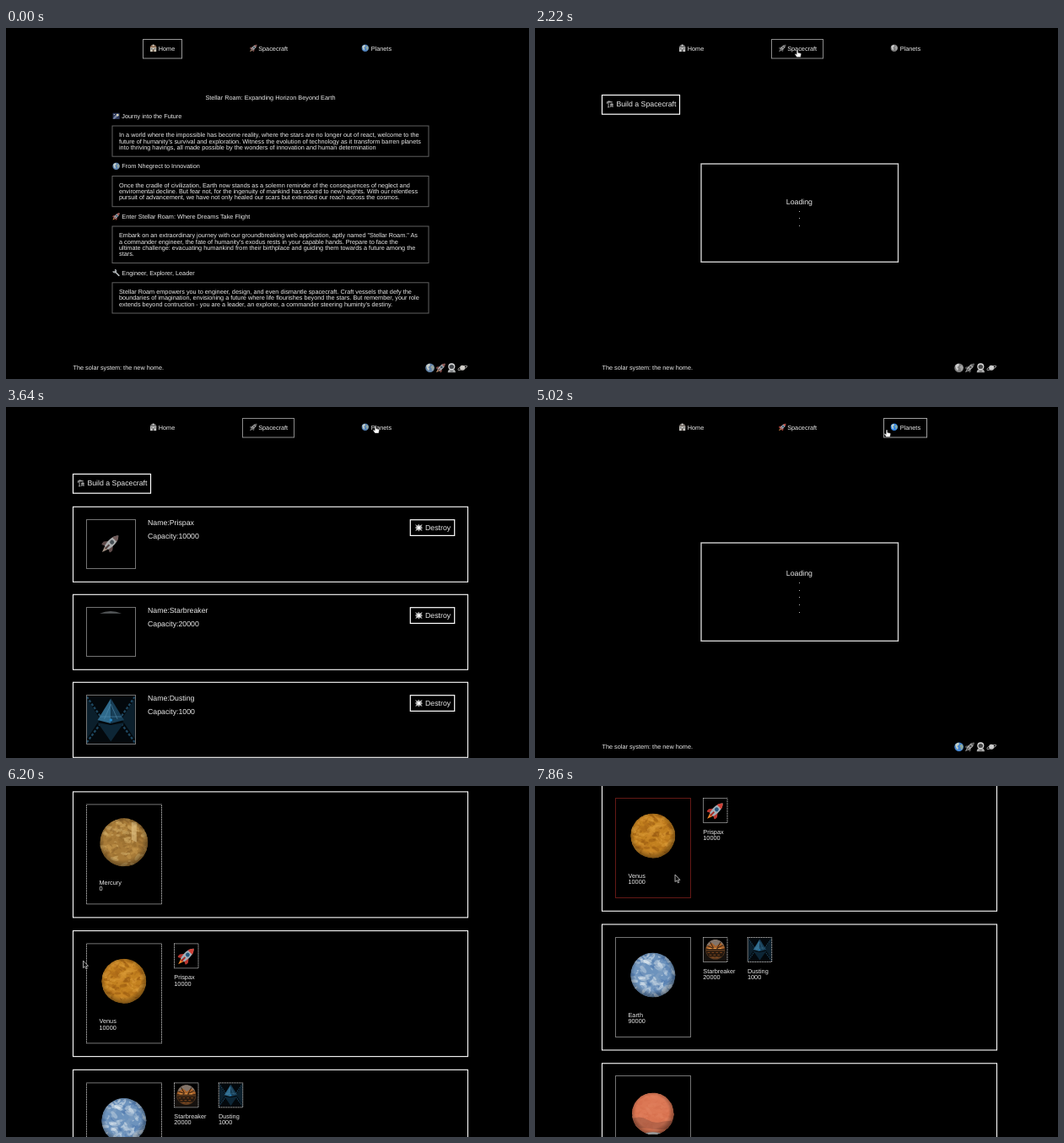
An HTML page for the animation above (8 s loop, 620x416 px).

```html
<!DOCTYPE html>
<html lang="en">
<head>
<meta charset="utf-8">
<title>Stellar Roam</title>
<style>
html, body { margin: 0; width: 100%; height: 100%; overflow: hidden; background: #000; }
svg#stage { display: block; width: 620px; height: 416px; }
text { font-family: "Liberation Sans", Arial, sans-serif; fill: #ececec; text-rendering: geometricPrecision; }
</style>
</head>
<body>
<svg id="stage" viewBox="0 0 620 416">
  <defs>
    <symbol id="house" viewBox="0 0 10 10">
      <path d="M1 4h8v6H1z" fill="#d8c49a"/>
      <path d="M.3 4.4 2.4 1h5.2l2.1 3.4z" fill="#b4682d"/>
      <path d="M4 .3h2v2H4z" fill="#f0e2c0"/>
      <path d="M2 5.3h1.6v1.5H2zM6.4 5.3H8v1.5H6.4z" fill="#4f6f8c"/>
      <path d="M4.1 6.5h1.8V10H4.1z" fill="#75431f"/>
    </symbol>
    <symbol id="rocket" viewBox="0 0 10 10">
      <g transform="rotate(45 5 5)">
        <path d="M3.8 8.4h2.4L5 11.8z" fill="#f0862c"/>
        <path d="M3.4 4.6 1.5 7v2.2l2.3-1.2zM6.6 4.6 8.5 7v2.2L6.2 8z" fill="#b8352e"/>
        <path d="M5-1.2C7.2.8 7.4 4.6 6.4 8.4H3.6C2.6 4.6 2.8.8 5-1.2z" fill="#a3aeb7"/>
        <path d="M5-1.2C6-.2 6.6.9 6.8 1.9H3.2C3.4.9 4-.2 5-1.2z" fill="#cf4238"/>
        <circle cx="5" cy="3.9" r="1.2" fill="#24577c"/>
        <path d="M4.5 6h1v3.2h-1z" fill="#a82c27"/>
      </g>
    </symbol>
    <symbol id="globe" viewBox="0 0 10 10">
      <circle cx="5" cy="5" r="4.7" fill="#4585cf"/>
      <path d="M1.2 2.6 3.8.7 5.4 1.5 4.6 3.2 3.2 4.4 4.3 5.7 3.8 8 2.6 7 1.6 4.8z" fill="#c3cfc4"/>
      <path d="M6.2 3 8.2 2.3 9.4 4.8 8.3 7.5 6.9 7.7 6.9 5.6 5.8 4.5z" fill="#8ea89a"/>
    </symbol>
    <symbol id="comet" viewBox="0 0 10 10">
      <path d="M.5 1h9v8h-9z" fill="#26386e"/>
      <path d="M.5 8.4 6 2.2l2.7 2L2.5 9z" fill="#6f86b8"/>
      <circle cx="6.9" cy="3.6" r="1.5" fill="#e8dc9a"/>
      <circle cx="2.4" cy="3" r=".6" fill="#fff"/>
    </symbol>
    <symbol id="wrench" viewBox="0 0 10 10">
      <path d="M3.2 3.2 8.6 8.6" stroke="#aeb6bc" stroke-width="1.8" stroke-linecap="round"/>
      <path d="M1 2.6A2 2 0 1 0 3.2.8" fill="none" stroke="#aeb6bc" stroke-width="1.4"/>
    </symbol>
    <symbol id="astronaut" viewBox="0 0 10 10">
      <path d="M1 10C1 7 2.6 6.3 5 6.3S9 7 9 10z" fill="#a9adb1"/>
      <circle cx="5" cy="3.7" r="3.5" fill="#d0d3d5"/>
      <ellipse cx="5" cy="3.9" rx="2.4" ry="2.2" fill="#3f474f"/>
      <path d="M3.6 7.7h2.8v1.4H3.6z" fill="#6c747b"/>
    </symbol>
    <symbol id="ringed" viewBox="0 0 10 10">
      <circle cx="5" cy="5" r="2.6" fill="#d9d3c6"/>
      <ellipse cx="5" cy="5" rx="5" ry="1.3" fill="none" stroke="#c3bdb2" stroke-width=".8" transform="rotate(-22 5 5)"/>
    </symbol>
    <symbol id="crane" viewBox="0 0 10 10">
      <path d="M.6 2.2h8M3 .8v8.8M1.6 9.5h3M.9 2.2v2.4M3 .9l4 1.2M6.2 9.5V5h2.6v4.5M5.5 5h4M6.2 7.2h2.6" fill="none" stroke="#d4d4d4" stroke-width=".9"/>
    </symbol>
    <symbol id="boom" viewBox="0 0 10 10">
      <path d="M.3.9 3.4 2.4 4.8.3 6 2.3 9.4.8 8.2 3.8 9.9 5.2 8 6.4 9.4 9.3 6.2 7.9 5 9.9 3.8 7.9.6 9.2 1.9 6.3.1 5 2 3.8z" fill="#a8a8a8"/>
      <path d="M3 3 5 3.6 7.2 3 6.6 5 7.2 7 5 6.5 3 7.1 3.5 5z" fill="#fff"/>
    </symbol>
    <symbol id="pyramid" viewBox="0 0 58 58">
      <path d="M0 0h58v58H0z" fill="#03080c"/>
      <path d="M0 3 16 28 0 52zM58 3 42 28 58 52z" fill="#0b1f2c"/>
      <path d="M0 1 16 24M58 1 42 24M0 56 16 34M58 56 42 34" stroke="#1d465f" stroke-width="2.4" stroke-dasharray="3 2"/>
      <path d="M29 3 13 29 29 33z" fill="#2f6a8c"/>
      <path d="M29 3 45 29 29 33z" fill="#183f58"/>
      <path d="M13 32 29 35 45 32 29 55z" fill="#0d2636"/>
      <path d="M29 10 21 28M29 10 37 28M16 25h26" stroke="#5590b0" stroke-width=".6"/>
      <circle cx="29" cy="29" r="1.8" fill="#2587c8"/>
    </symbol>
    <symbol id="station" viewBox="0 0 29 29">
      <path d="M0 16h29v13H0z" fill="#15110e"/>
      <circle cx="14.5" cy="14.5" r="12" fill="#5c3a1f"/>
      <path d="M4 9.5C8-.5 21-.5 25 9.5L14 12z" fill="#82746a"/>
      <path d="M3 12 10 6l5 4 6-4 5 6-3 2H5z" fill="#a8622a"/>
      <path d="M3 14h23M5 10l8 3M24 9l-8 4M8 5l4 7M21 5l-4 7" stroke="#2c1c10" stroke-width="1"/>
      <path d="M3 16h23l-3 7H6z" fill="#24180f"/>
      <path d="M5 18h19M7 21h15M10 24h9" stroke="#8f5020" stroke-width=".9" stroke-dasharray="3 2"/>
      <path d="M6 13h17" stroke="#f0a04a" stroke-width="1" stroke-dasharray="4 2"/>
    </symbol>
    <radialGradient id="shade" cx=".48" cy=".46" r=".56">
      <stop offset=".7" stop-color="#000" stop-opacity="0"/>
      <stop offset="1" stop-color="#000" stop-opacity=".45"/>
    </radialGradient>
  </defs>
</svg>
<script>
const stage = document.getElementById('stage');
const LOOP = 8000, SMALL = 7.3, BIG = 8.76;

function add(parent, tag, attrs) {
  const node = document.createElementNS('http://www.w3.org/2000/svg', tag);
  for (const k in attrs) node.setAttribute(k, attrs[k]);
  return parent.appendChild(node);
}
const group = parent => add(parent, 'g', {});
// y is the middle of the text line
function label(parent, x, y, str, size = SMALL, anchor = 'start') {
  const node = add(parent, 'text', { x, y: y + size * 0.3465, 'font-size': size, 'text-anchor': anchor });
  node.textContent = str;
  return node;
}
function box(parent, x, y, w, h, stroke = '#fff', width = 1.1) {
  return add(parent, 'rect', { x, y, width: w, height: h, fill: 'none', stroke, 'stroke-width': width });
}
function dotted(parent, x, y, w, h) {
  const node = box(parent, x, y, w, h, '#e8e8e8', 1);
  node.setAttribute('stroke-dasharray', '1 1');
  return node;
}
function icon(parent, id, cx, cy, size, sat = 1) {
  const node = add(parent, 'use', { href: '#' + id, x: cx - size / 2, y: cy - size / 2, width: size, height: size });
  node.style.filter = `saturate(${sat})`;
  return node;
}

let seed = 7;
const rand = () => (seed = (seed * 16807) % 2147483647) / 2147483647;

const scroller = group(stage);
const home = group(scroller), hangar = group(scroller), list = group(scroller);
const loading = group(scroller), planets = group(scroller), footer = group(scroller), nav = group(scroller);

// Navigation
const tabs = [
  { name: 'Home', id: 'house', x: 162.5, w: 46, ix: 174.6, tx: 180.8, stroke: '#989898' },
  { name: 'Spacecraft', id: 'rocket', x: 280.5, w: 61, ix: 293.4, tx: 299.2, stroke: '#8c8c8c' },
  { name: 'Planets', id: 'globe', x: 413.5, w: 51, ix: 425.8, tx: 432.7, stroke: '#a0a0a0' }
];
for (const tab of tabs) {
  tab.frame = box(nav, tab.x, 13.5, tab.w, 22.5, tab.stroke, 1);
  tab.icon = icon(nav, tab.id, tab.ix, 23.8, 9);
  label(nav, tab.tx, 24, tab.name);
}

// Footer
label(footer, 79.5, 402.6, 'The solar system: the new home.');
const footIcons = ['globe', 'rocket', 'astronaut', 'ringed'].map((id, i) =>
  icon(footer, id, 502.6 + i * 12.85, 402.8, 11.5));

// Home page
const sections = [
  ['comet', 'Journy into the Future',
    'In a world where the impossible has become reality, where the stars are no longer out of react, welcome to the',
    "future of humanity's survival and exploration. Witness the evolution of technology as it transform barren planets",
    'into thriving havings, all made possible by the wonders of innovation and human determination'],
  ['globe', 'From Nhegrect to Innovation',
    'Once the cradle of civilization, Earth now stands as a solemn reminder of the consequences of neglect and',
    'enviromental decline. But fear not, for the ingenuity of mankind has soared to new heights. With our relentless',
    'pursuit of advancement, we have not only healed our scars but extended our reach across the cosmos.'],
  ['rocket', 'Enter Stellar Roam: Where Dreams Take Flight',
    'Embark on an extraordinary journey with our groundbreaking web application, aptly named "Stellar Roam." As',
    "a commander engineer, the fate of humanity's exodus rests in your capable hands. Prepare to face the",
    'ultimate challenge: evacuating humankind from their birthplace and guiding them towards a future among the',
    'stars.'],
  ['wrench', 'Engineer, Explorer, Leader',
    'Stellar Roam empowers you to engineer, design, and even dismantle spacecraft. Craft vessels that defy the',
    'boundaries of imagination, envisioning a future where life flourishes beyond the stars. But remember, your role',
    "extends beyond contruction - you are a leader, an explorer, a commander steering huminty's destiny."]
];
label(home, 313.5, 82.8, 'Stellar Roam: Expanding Horizon Beyond Earth', SMALL, 'middle');
let mid = 104.3;
for (const [id, head, ...lines] of sections) {
  icon(home, id, 130.6, mid, 9, 0.6);
  label(home, 137.3, mid, head);
  box(home, 126, mid + 11.7, 375, (lines.length + 2) * SMALL - 0.3, '#606060', 1);
  lines.forEach((line, i) => label(home, 134, mid + 22.4 + i * SMALL, line));
  mid += 37.6 + lines.length * SMALL;
}

// Spacecraft page
box(hangar, 79.5, 79.5, 92, 22.7, '#fff', 1.2);
icon(hangar, 'crane', 88.8, 90.2, 8.5);
label(hangar, 96.4, 90.2, 'Build a Spacecraft', BIG);
[['Prispax', 10000], ['Starbreaker', 20000], ['Dusting', 1000]].forEach(([name, seats], i) => {
  const y = 118.3 + Math.round(i * 104.2);
  box(list, 79.5, y, 468, 89);
  if (i === 0) icon(list, 'rocket', 124, y + 43.5, 21, 0.15);
  if (i === 1) add(list, 'path', { d: `M111 ${y + 22.5}Q124 ${y + 17} 137 ${y + 22.5}z`, fill: '#55585a' });
  if (i === 2) icon(list, 'pyramid', 124.3, y + 44.7, 57);
  dotted(list, 95.5, Math.round(y + 15) + 0.5, 58, 58);
  label(list, 168, y + 19, 'Name:' + name, BIG);
  label(list, 168, y + 35, 'Capacity:' + seats, BIG);
  box(list, 479.3, y + 15.4, 52.4, 18.7, '#fff', 1.2);
  icon(list, 'boom', 489.4, y + 24.7, 9.5);
  label(list, 497, y + 24.9, 'Destroy', BIG);
});

// Loading panel
box(loading, 197, 161, 233.5, 116.3, '#d0d0d0', 1.4);
const waitLines = Array.from({ length: 6 }, (_, i) =>
  label(loading, 313.4, 0, i ? '.' : 'Loading', BIG, 'middle'));

// Planets page
const worlds = [
  { name: 'Mercury', people: 0, r: 28.5, dy: 60, base: '#a87b38', tones: ['#8a6128', '#c79a4e', '#946a2c', '#d8b46e'], ships: [] },
  { name: 'Venus', people: 10000, r: 26.5, dy: 59.7, base: '#c2801f', tones: ['#94540f', '#dc9b38', '#b06c18', '#cf8a2a'], ships: [['Prispax', 10000, 'rocket']] },
  { name: 'Earth', people: 90000, r: 26.5, dy: 60, base: '#6d93bd', tones: ['#e6edf2', '#4c77ac', '#c3d3e2', '#86a4c4'], ships: [['Starbreaker', 20000, 'station'], ['Dusting', 1000, 'pyramid']] },
  { name: 'Mars', people: 0, r: 24.8, dy: 59.5, base: '#dc7855', tones: ['#d87350', '#e28260', '#d56e4d', '#e07c5a'], ships: [] }
];
worlds.forEach((w, n) => {
  const y = 79.5 + n * 164.75, cx = 139.8, cy = y + w.dy;
  box(planets, 79.5, y, 468, 149);
  const clip = add(planets, 'clipPath', { id: 'disc' + n });
  add(clip, 'circle', { cx, cy, r: w.r });
  const disc = add(planets, 'g', { 'clip-path': `url(#disc${n})` });
  add(disc, 'circle', { cx, cy, r: w.r, fill: w.base });
  for (let i = 0; i < 160; i++) {
    const a = rand() * 6.283, d = Math.sqrt(rand()) * w.r, s = 0.6 + rand() * 3;
    const x = cx + Math.cos(a) * d, py = cy + Math.sin(a) * d;
    add(disc, 'ellipse', {
      cx: x, cy: py, rx: s * 1.5, ry: s * 0.65, fill: w.tones[i % 4], opacity: 0.5,
      transform: `rotate(${rand() * 120 - 60} ${x} ${py})`
    });
  }
  if (n === 0) add(disc, 'path', { d: `M${cx + 9} ${cy - 24}h6v24l-6-3z`, fill: '#e3c588', opacity: 0.6 });
  if (n === 3) {
    add(disc, 'path', { d: `M${cx - 25} ${cy + 6}q10-4 18 1t16 3 16-1v8q-18 3-28 1t-22 0z`, fill: '#96523f', opacity: 0.55 });
    add(disc, 'ellipse', { cx, cy: cy + 24.5, rx: 10, ry: 2.6, fill: '#d5dde0' });
  }
  add(disc, 'circle', { cx, cy, r: w.r, fill: 'url(#shade)' });
  w.frame = dotted(planets, 95.5, Math.round(y + 15.6) - 0.5, 89, 118);
  label(planets, 110.5, y + 107.2, w.name);
  label(planets, 110.5, y + 114.5, w.people);
  w.ships.forEach(([name, seats, id], i) => {
    const x = 199.5 + i * 52.7;
    icon(planets, id, x + 14.3, y + 30, id === 'rocket' ? 20 : 28);
    dotted(planets, x, Math.round(y + 15.6) - 0.5, 28.5, 29);
    label(planets, x - 0.2, y + 55.2, name);
    label(planets, x - 0.2, y + 62.5, seats);
  });
});

// Pointer
const pointer = group(stage);
const arrow = add(pointer, 'path', { d: 'M0 0V8.6L2 6.9 3.4 9.8 4.8 9.2 3.5 6.3H6z', fill: '#111', stroke: '#ccc', 'stroke-width': 0.8 });
const hand = add(pointer, 'path', { d: 'M-.8.5Q0-.4.8.5V3.2L4 4Q4.6 4.2 4.5 5L3.8 8.6H-.6L-2.9 5.2Q-2.6 4.2-1.6 4.8L-.8 5.4z', fill: '#fff', stroke: '#222', 'stroke-width': 0.4 });

const path = [
  [160, 505, 300], [400, 410, 130], [700, 322, 39], [920, 322, 39], [1160, 311, 26],
  [2960, 311, 26], [3220, 422, 24], [3560, 423, 24], [3640, 438, 22.5], [4460, 438, 22.5],
  [4800, 417, 27], [5040, 417, 27], [5300, 99, 188], [5700, 99, 188], [6020, 91.5, 207],
  [6380, 91.5, 207], [6460, 112, 215], [6620, 118, 200], [6780, 116, 165], [6840, 116, 165],
  [7040, 130, 110], [7380, 163, 108], [7780, 163, 108], [7860, 166, 105], [8000, 166, 105]
];
const greens = [[6380, 232, 232, 232], [6460, 60, 150, 65], [6800, 60, 150, 65], [6960, 232, 232, 232]];
const reds = [[6900, 232, 232, 232], [7100, 205, 130, 125], [7780, 205, 130, 125], [7860, 200, 50, 45]];
const scrolls = [[6100, 0], [6380, 245]];

// Eased values of a track of [time, ...values]
function at(track, t) {
  if (t <= track[0][0]) return track[0].slice(1);
  const i = track.findIndex(k => k[0] > t);
  if (i < 0) return track[track.length - 1].slice(1);
  const a = track[i - 1], b = track[i];
  const u = (t - a[0]) / (b[0] - a[0]), e = u * u * (3 - 2 * u);
  return a.slice(1).map((v, j) => v + (b[j + 1] - v) * e);
}

// Stages: home, loading ships, ships, loading planets, planets
const starts = [0, 1600, 2700, 3700, 5640];
const tabOf = [0, 1, 1, 2, 2];
const tint = {
  tabs: [[0.4, 0, 0, 0.1, 1], [0.35, 0, 0, 0.8, 1], [0.8, 0, 0.7, 1.3, 0]],
  foot: [[0.5, 0, 0, 1, 0], [0.4, 0, 0, 0, 0]]
};
const show = (node, on) => node.setAttribute('display', on ? 'inline' : 'none');
const rgb = c => `rgb(${c.map(Math.round).join()})`;

function draw(t) {
  const step = starts.filter(s => t >= s).length - 1;
  const waiting = step === 1 || step === 3;
  show(home, step === 0);
  show(hangar, step === 1 || step === 2);
  show(list, step === 2);
  show(loading, waiting);
  show(planets, step === 4);
  show(footer, step === 0 || waiting);

  tabs.forEach((tab, i) => {
    show(tab.frame, tabOf[step] === i);
    tab.icon.style.filter = `saturate(${tint.tabs[i][step]})`;
  });
  footIcons.forEach((node, i) => node.style.filter = `saturate(${tint.foot[i ? 1 : 0][step]})`);

  if (waiting) {
    const dots = Math.min(5, Math.floor((t - starts[step]) / 200));
    waitLines.forEach((node, i) => {
      show(node, i <= dots);
      node.setAttribute('y', 218.9 + (i - dots / 2) * BIG + BIG * 0.3465);
    });
  }

  scroller.setAttribute('transform', `translate(0 ${-at(scrolls, t)[0]})`);
  worlds[1].frame.setAttribute('stroke', rgb(at(reds, t)));
  worlds[2].frame.setAttribute('stroke', rgb(at(greens, t)));

  const [x, y] = at(path, t);
  const onTab = y < 36 && tabs.some(tab => x > tab.x && x < tab.x + tab.w);
  show(pointer, t >= 160);
  show(hand, onTab);
  show(arrow, !onTab);
  pointer.setAttribute('transform', `translate(${x} ${y})`);
}

const begin = performance.now();
function tick() {
  draw((performance.now() - begin) % LOOP);
  requestAnimationFrame(tick);
}
tick();
</script>
</body>
</html>
```
